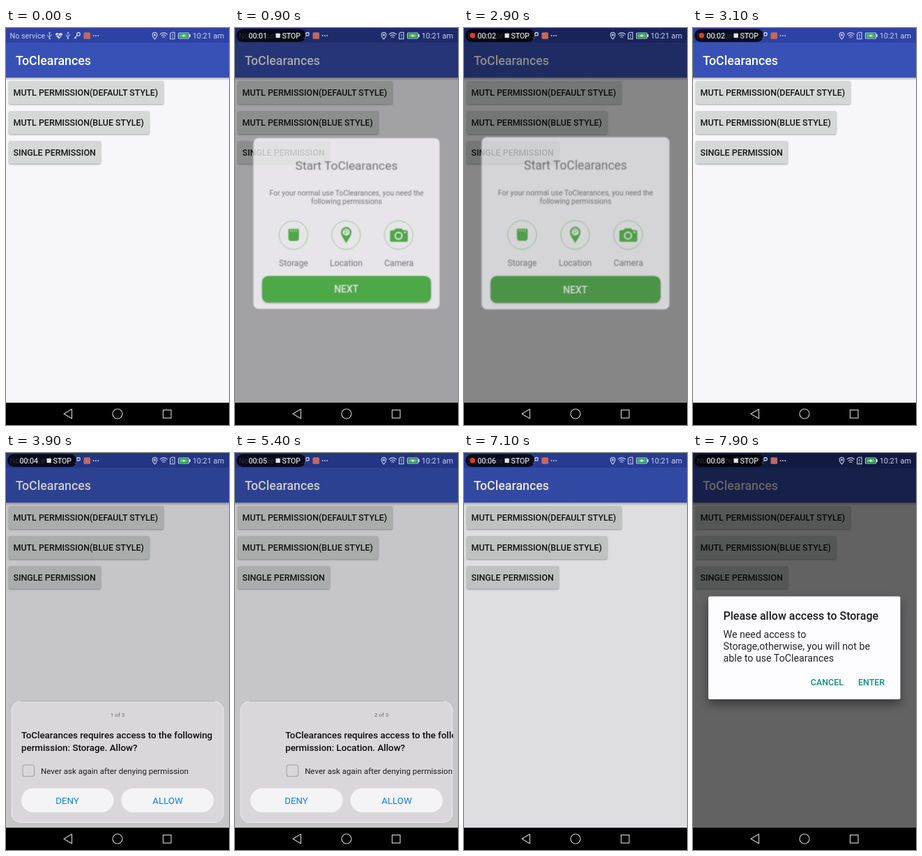
Recreate the animation shown at these times as an HTML page. Size 320x569 px, loop 8 s.

```html
<!DOCTYPE html>
<html lang="en">
<head>
<meta charset="utf-8">
<title>Permission dialogs</title>
<style>
html, body { margin: 0; width: 100%; height: 100%; overflow: hidden; background: #000; }
svg { position: fixed; inset: 0; width: 100%; height: 100%; display: block; }
text { font-family: Roboto, "Noto Sans", sans-serif; white-space: pre; }
.mid { text-anchor: middle; }
.btn { font-size: 12.44px; font-weight: 500; fill: #141414; }
.raised { fill: #d6d7d7; filter: drop-shadow(0 1px 1px rgba(0,0,0,.35)); }
.line { fill: none; stroke: #c9d0ee; }
.lit { fill: #c9d0ee; }

/* every track shares one 8 s clock */
.t { animation: 8s linear infinite both; }
.box { transform-box: fill-box; transform-origin: center; }
#dim { animation-name: dim; }
#start { animation-name: start; }
#sheet { animation-name: sheet; }
#alert { animation-name: alert; }
#pill { animation-name: pill; }
#dot { animation-name: blink; animation-timing-function: step-end; }
#digit { animation-name: tick; animation-timing-function: step-end; }
#p1 { animation-name: page1; }
#p2 { animation-name: page2; }
#p3 { animation-name: page3; }
.tap { opacity: 0; transform-box: fill-box; transform-origin: center; animation: tap 8s linear infinite; }
.hold { animation-name: hold; }

@keyframes dim {
  0%, 8.75% { opacity: 0; }
  13.1%, 35.6% { opacity: .6; }
  38.4%, 39.4% { opacity: 0; }
  42.5%, 86.6% { opacity: .2; }
  88.6%, 89% { opacity: .1; }
  92.4%, 100% { opacity: .6; }
}
@keyframes start {
  0%, 8.75% { opacity: 0; transform: scale(.9); animation-timing-function: ease-out; }
  13.1%, 35.6% { opacity: 1; transform: none; }
  37.6%, 100% { opacity: 0; transform: scale(.95); }
}
@keyframes sheet {
  0%, 39.4% { opacity: 0; transform: translateY(40px); animation-timing-function: ease-out; }
  42.5%, 86.6% { opacity: 1; transform: none; }
  88.2%, 100% { opacity: 0; transform: translateY(20px); }
}
@keyframes alert {
  0%, 89.2% { opacity: 0; transform: scale(.9); animation-timing-function: ease-out; }
  92.4%, 100% { opacity: 1; transform: none; }
}
@keyframes pill {
  0%, 1% { opacity: 0; }
  2.4%, 100% { opacity: 1; }
}
@keyframes blink {
  0%, 19.7%, 33.5%, 44.7%, 56%, 69.8%, 83.5%, 96% { opacity: 1; }
  9.7%, 23.4%, 43.5%, 48.5%, 63.5%, 74.7%, 91%, 98.4%, 100% { opacity: 0; }
}
@keyframes tick {
  0% { transform: none; }
  9.7% { transform: translateY(-20px); }
  23.4% { transform: translateY(-40px); }
  43.5% { transform: translateY(-60px); }
  48.5% { transform: translateY(-80px); }
  63.5% { transform: translateY(-100px); }
  74.7% { transform: translateY(-120px); }
  91% { transform: translateY(-140px); }
  98.4%, 100% { transform: translateY(-160px); }
}
@keyframes page1 {
  0%, 63.75% { transform: none; animation-timing-function: cubic-bezier(.4,0,1,1); }
  66.2%, 100% { transform: translateX(-305px); }
}
@keyframes page2 {
  0%, 66.25% { transform: translateX(305px); animation-timing-function: cubic-bezier(0,0,.2,1); }
  68.8%, 75% { transform: none; animation-timing-function: cubic-bezier(.4,0,1,1); }
  77.5%, 100% { transform: translateX(-305px); }
}
@keyframes page3 {
  0%, 78.9% { transform: translateX(305px); animation-timing-function: cubic-bezier(0,0,.2,1); }
  81.4%, 100% { transform: none; }
}
@keyframes tap {
  0% { opacity: 0; transform: scale(.15); }
  .8% { opacity: .16; }
  2.5% { opacity: .16; transform: none; }
  4%, 100% { opacity: 0; transform: none; }
}
@keyframes hold {
  0% { opacity: 0; transform: scale(.15); }
  1.2% { opacity: .14; }
  7.5%, 10% { opacity: .14; transform: none; }
  12.5%, 100% { opacity: 0; transform: none; }
}
</style>
</head>
<body>
<svg viewBox="0 0 320 569">
  <defs>
    <clipPath id="cTop"><rect x="4" y="76" width="222" height="33" rx="2"/></clipPath>
    <clipPath id="cNext"><rect x="36" y="356" width="248" height="39" rx="9"/></clipPath>
    <clipPath id="cDeny"><rect x="22" y="480.5" width="132.5" height="34.5" rx="17.2"/></clipPath>
    <clipPath id="cAllow"><rect x="165.5" y="480.5" width="132.5" height="34.5" rx="17.2"/></clipPath>
    <clipPath id="cSheet"><rect x="8" y="357" width="304.5" height="122"/></clipPath>
    <clipPath id="cDigit"><rect x="39" y="3" width="10" height="16"/></clipPath>
    <linearGradient id="shade" x2="0" y2="1">
      <stop stop-color="#000" stop-opacity=".3"/><stop offset="1" stop-color="#000" stop-opacity="0"/>
    </linearGradient>
    <g id="fork" fill="none" stroke="#c9d0ee" stroke-width=".9">
      <path d="M0-4.5V4M-2.6-1.5V.6L0 2.4M2.6-2V-.4L0 1.4"/>
      <circle cy="4" r=".8" fill="#c9d0ee"/>
      <path d="M-1.2-3.6 0-5.2 1.2-3.6"/>
    </g>
    <g id="check">
      <rect x="24" y="447" width="16.5" height="16.5" rx="3" fill="none" stroke="#a3a2a5" stroke-width="1.1"/>
      <text x="50" y="459.6" font-size="11.56" fill="#1c1c1d">Never ask again after denying permission</text>
    </g>
    <text id="ask" x="22" y="409" font-size="13.33" font-weight="500" fill="#0c0c0d">ToClearances requires access to the following</text>
  </defs>

  <!-- app screen -->
  <rect width="320" height="569" fill="#f7f6f9"/>
  <rect y="71" width="320" height="4" fill="url(#shade)"/>
  <rect width="320" height="71" fill="#3851b7"/>
  <rect width="320" height="21" fill="#2d42a3"/>
  <text x="14" y="52.9" font-size="17.78" font-weight="500" fill="#fff">ToClearances</text>
  <rect class="raised" x="4" y="76" width="222" height="33" rx="2"/>
  <rect class="raised" x="4" y="119" width="201.5" height="33" rx="2"/>
  <rect class="raised" x="4" y="162" width="132" height="32.5" rx="2"/>
  <g clip-path="url(#cTop)"><circle class="tap" style="animation-delay:.4s" cx="115" cy="92" r="112"/></g>
  <text class="btn" x="10.5" y="97.4">MUTL PERMISSION(DEFAULT STYLE)</text>
  <text class="btn" x="10.5" y="140.2">MUTL PERMISSION(BLUE STYLE)</text>
  <text class="btn" x="10.5" y="182.8">SINGLE PERMISSION</text>

  <rect id="dim" class="t" width="320" height="537"/>

  <!-- navigation bar -->
  <rect y="537" width="320" height="32"/>
  <g fill="none" stroke="#c8c8c8" stroke-width="1.2">
    <path d="M94.5 546.3V559.7L83 553Z" stroke-linejoin="round"/>
    <circle cx="160" cy="553" r="7"/>
    <rect x="225.5" y="547.5" width="11.5" height="11.5"/>
  </g>

  <!-- status bar -->
  <text class="lit" x="5.5" y="14.8" font-size="10.8">No service</text>
  <use href="#fork" x="62.5" y="11"/>
  <path class="lit" d="M76 15.8 71.3 11C69.6 8.2 73.4 5.4 76 8.2 78.6 5.4 82.4 8.2 80.7 11Z"/>
  <path d="M71 11H74L75.3 9 77 13 78 11H81" fill="none" stroke="#2d42a3" stroke-width=".9"/>
  <use href="#fork" x="89" y="11"/>
  <g class="line" stroke-width="1.3">
    <circle cx="104" cy="8.8" r="2.3"/>
    <path d="M102.3 10.5 98 15M99.4 13.6 100.8 15"/>
  </g>
  <rect x="111.5" y="6.2" width="9.5" height="9.5" rx="1.5" fill="#c4685f"/>
  <g class="lit"><circle cx="125.6" cy="11" r=".9"/><circle cx="128.9" cy="11" r=".9"/><circle cx="132.2" cy="11" r=".9"/></g>
  <g class="line" stroke-width="1.1">
    <path d="M213.5 16C208.6 11 209.6 6.2 213.5 6.2S218.4 11 213.5 16Z"/>
    <circle cx="213.5" cy="9.9" r="1"/>
    <path d="M220.8 9.2Q226.3 4.6 231.8 9.2M222.6 11.4Q226.3 8.3 230 11.4M224.4 13.5Q226.3 12 228.2 13.5"/>
    <path d="M235.6 8.2 237.6 6.2H242V15.8H235.6ZM238.8 8.7V11.8M238.8 13V14.2"/>
    <rect x="247.5" y="7" width="15" height="8" rx="1"/>
  </g>
  <rect class="lit" x="263" y="9" width="1.8" height="4"/>
  <rect x="248.8" y="8.3" width="12.4" height="5.4" fill="#35c94a"/>
  <path d="M252.6 11H257.4M255 9V13" stroke="#fff"/>
  <text class="lit" x="313" y="14.8" font-size="10.9" text-anchor="end">10:21 am</text>

  <!-- recorder pill -->
  <g id="pill" class="t">
    <rect x="2" y="1.5" width="99.5" height="18.5" rx="9.2" fill="#000" fill-opacity=".8"/>
    <circle id="dot" class="t" cx="12.3" cy="10.8" r="3.7" fill="#f03a1e"/>
    <g fill="#fff" font-size="10.6">
      <text x="19.6" y="14.7">00:0</text>
      <g clip-path="url(#cDigit)">
        <g id="digit" class="t">
          <text x="40.1" y="14.7">0</text><text x="40.1" y="34.7">1</text><text x="40.1" y="54.7">2</text>
          <text x="40.1" y="74.7">3</text><text x="40.1" y="94.7">4</text><text x="40.1" y="114.7">5</text>
          <text x="40.1" y="134.7">6</text><text x="40.1" y="154.7">7</text><text x="40.1" y="174.7">8</text>
        </g>
      </g>
      <text x="67.6" y="14.7">STOP</text>
    </g>
    <rect x="58.5" y="7.7" width="6.3" height="6.3" rx=".6" fill="#e4e4e8"/>
  </g>

  <!-- start dialog -->
  <g id="start" class="t box">
    <rect x="22.8" y="153.2" width="274.4" height="251.6" rx="8" fill="#fdfcff" stroke="#a9a8ab" stroke-width=".9"/>
    <g class="mid" fill="#66656a">
      <text x="160" y="200.4" font-size="17.78">Start ToClearances</text>
      <g font-size="10.67">
        <text x="160" y="238">For your normal use ToClearances, you need the</text>
        <text x="160" y="250.4">following permissions</text>
      </g>
      <g font-size="12.44">
        <text x="82" y="341.6">Storage</text>
        <text x="159.5" y="341.6">Location</text>
        <text x="237" y="341.6">Camera</text>
      </g>
    </g>
    <g fill="none" stroke="#7fc67b" stroke-width=".8">
      <circle cx="82" cy="296" r="21"/><circle cx="159.3" cy="296" r="21"/><circle cx="236.6" cy="296" r="21"/>
    </g>
    <g fill="#33ab2b">
      <path d="M74.5 288.5Q74.5 287 76 287H88.5Q90 287 90 288.5V302L88 304.5H76.5L74.5 302Z"/>
      <path d="M159.5 308C156 301.5 151.8 297 151.8 291.8A7.7 7.7 0 0 1 167.2 291.8C167.2 297 163 301.5 159.5 308Z"/>
      <path d="M224 291Q224 289 226 289H230L232 286.5H241L243 289H248Q250 289 250 291V304Q250 306 248 306H226Q224 306 224 304Z"/>
      <rect x="36" y="356" width="248" height="39" rx="9" style="filter:drop-shadow(0 1px 1px rgba(0,0,0,.35))"/>
    </g>
    <path d="M77.5 288.5V291M80.5 288.5V291M83.5 288.5V291M86.5 288.5V291" stroke="#fff"/>
    <circle cx="159.5" cy="291.8" r="5.2" fill="#fff"/>
    <text class="mid" x="159.6" y="295.2" font-size="9" fill="#33ab2b">P</text>
    <circle cx="236.5" cy="297" r="5" fill="none" stroke="#fff" stroke-width="2"/>
    <rect x="244.5" y="291" width="3" height="2" fill="#fff"/>
    <g clip-path="url(#cNext)"><circle class="tap" style="animation-delay:2.65s" cx="160" cy="376" r="125"/></g>
    <text class="mid" x="159.6" y="380.8" font-size="14.22" font-weight="500" fill="#fff">NEXT</text>
  </g>

  <!-- system sheet -->
  <g id="sheet" class="t">
    <rect x="8" y="356" width="304" height="173.5" rx="13" fill="#d9d7da" stroke="#ececee" stroke-width=".9"/>
    <path d="M20 355.6H300" stroke="#a3a2a5" stroke-width=".9"/>
    <g clip-path="url(#cSheet)">
      <g id="p1" class="t">
        <text class="mid" x="160" y="378.2" font-size="8" fill="#6a696c">1 of 3</text>
        <use href="#ask"/><use href="#check"/>
        <text x="22" y="427" font-size="13.33" font-weight="500" fill="#0c0c0d">permission: Storage. Allow?</text>
      </g>
      <g id="p2" class="t">
        <text class="mid" x="160" y="378.2" font-size="8" fill="#6a696c">2 of 3</text>
        <use href="#ask"/><use href="#check"/>
        <text x="22" y="427" font-size="13.33" font-weight="500" fill="#0c0c0d">permission: Location. Allow?</text>
      </g>
      <g id="p3" class="t">
        <text class="mid" x="160" y="378.2" font-size="8" fill="#6a696c">3 of 3</text>
        <use href="#ask"/><use href="#check"/>
        <text x="22" y="427" font-size="13.33" font-weight="500" fill="#0c0c0d">permission: Camera. Allow?</text>
      </g>
    </g>
    <g fill="#f4f3f6">
      <rect x="22" y="480.5" width="132.5" height="34.5" rx="17.2"/>
      <rect x="165.5" y="480.5" width="132.5" height="34.5" rx="17.2"/>
    </g>
    <g clip-path="url(#cDeny)"><circle class="tap hold" style="animation-delay:4.28s" cx="88" cy="498" r="68"/></g>
    <g clip-path="url(#cAllow)">
      <circle class="tap" style="animation-delay:5.93s" cx="232" cy="498" r="68"/>
      <circle class="tap" style="animation-delay:6.8s" cx="232" cy="498" r="68"/>
    </g>
    <g class="mid" font-size="13.33" fill="#0a84e4">
      <text x="88" y="502.8">DENY</text>
      <text x="232" y="502.8">ALLOW</text>
    </g>
  </g>

  <!-- storage alert -->
  <g id="alert" class="t box">
    <rect x="22" y="205.5" width="275.5" height="147.5" rx="2" fill="#fdfcff" style="filter:drop-shadow(0 7px 7px rgba(0,0,0,.4))"/>
    <text x="43.5" y="238.8" font-size="16" font-weight="500" fill="#1b1b1d">Please allow access to Storage</text>
    <g font-size="14.22" fill="#252527">
      <text x="43.5" y="265.2">We need access to</text>
      <text x="43.5" y="282.2">Storage,otherwise, you will not be</text>
      <text x="43.5" y="299.2">able to use ToClearances</text>
    </g>
    <g font-size="12.44" font-weight="500" fill="#0a8f86">
      <text x="168.8" y="333">CANCEL</text>
      <text x="237" y="333">ENTER</text>
    </g>
  </g>
</svg>
</body>
</html>
```
